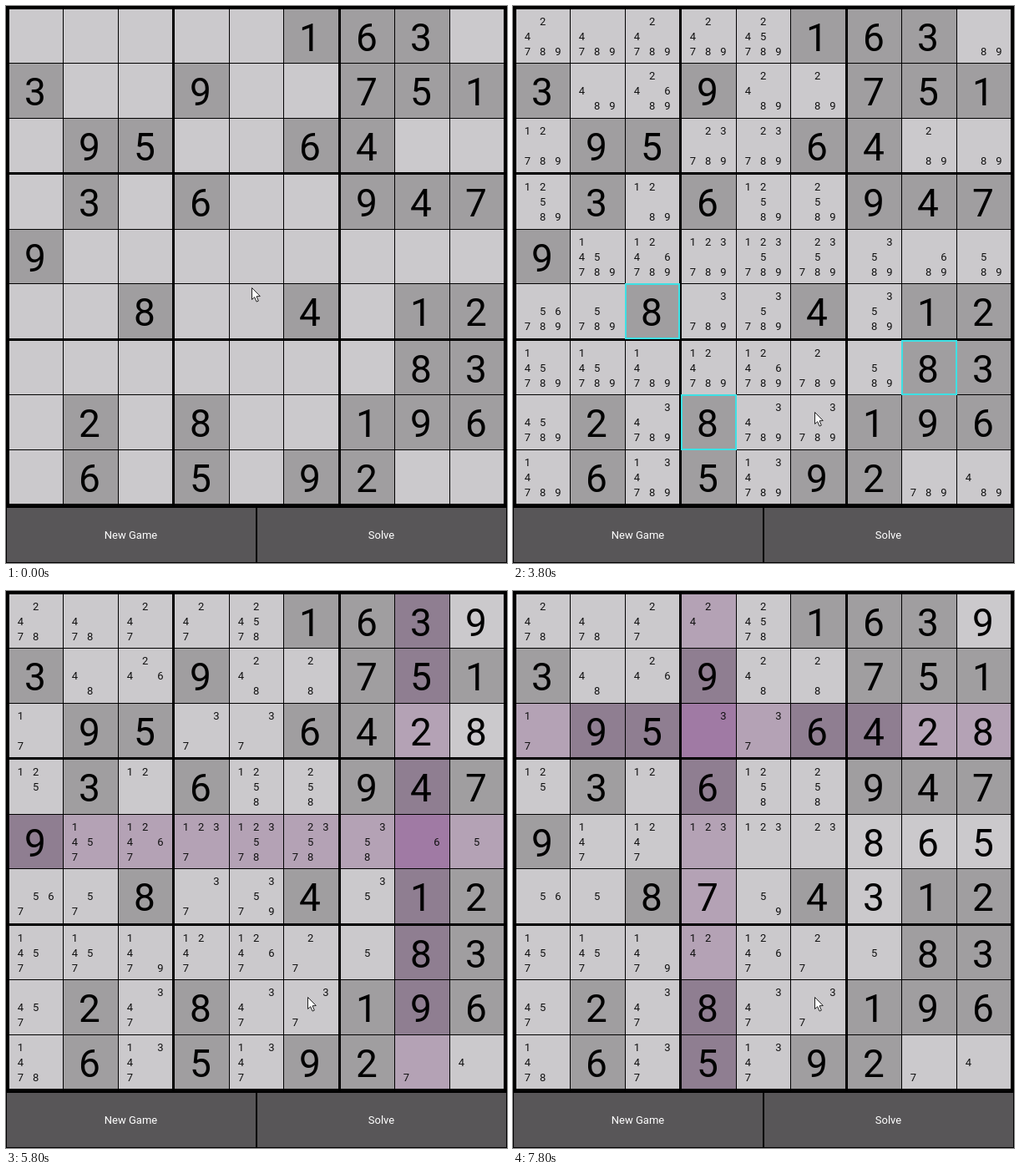
An HTML page with a canvas that plays this animation: 600 by 667 pixels, repeating every 8 s.

```html
<!DOCTYPE html>
<html lang="en">
<head>
<meta charset="utf-8">
<title>Sudoku solver</title>
<style>
  html, body { margin: 0; width: 100%; height: 100%; overflow: hidden; background: #000; }
  canvas { display: block; width: 600px; height: 667px; }
</style>
</head>
<body>
<canvas id="stage" width="600" height="667"></canvas>
<script>
const LOOP = 8000;
const ctx = document.getElementById('stage').getContext('2d');
const puzzle = '.....163.3..9..751.95..64...3.6..9479..........8..4.12.......83.2.8..196.6.5.92..';
const given = [...puzzle].map(ch => +ch || 0);
const rowOf = i => Math.floor(i / 9), colOf = i => i % 9;
const boxOf = i => Math.floor(rowOf(i) / 3) * 3 + Math.floor(colOf(i) / 3);
const arePeers = (a, b) => a !== b &&
  (rowOf(a) === rowOf(b) || colOf(a) === colOf(b) || boxOf(a) === boxOf(b));

// Cell edges: thin gaps of 1px, box gaps of 3px
const SIZE = 580 / 9;
const edge = n => 4 + n * (SIZE + 1) + 2 * Math.floor(n / 3);
const start = n => Math.round(edge(n));
const end = n => Math.round(edge(n) + SIZE);

// Run the solver once and record a timeline of board states
const timeline = [];
const board = [...given];
let notes = given.map(() => new Set());

function record(time, marks = {}) {
  timeline.push({ time, board: [...board], notes: notes.map(s => [...s]), digit: 0, focus: -1, ...marks });
}
function eliminate(cell) {
  notes.forEach((set, i) => { if (arePeers(i, cell)) set.delete(board[cell]); });
}

record(0);
notes = given.map(v => new Set(v ? [] : [1, 2, 3, 4, 5, 6, 7, 8, 9]));
record(800);
for (let digit = 1; digit <= 9; digit++) {
  const time = 600 + 400 * digit;
  record(time, { digit });
  given.forEach((v, i) => { if (v === digit) eliminate(i); });
  record(time + 200, { digit });
}
record(4500);
for (let k = 0; k < 9; k++) {
  const time = 4600 + 400 * k;
  const focus = notes.findIndex(s => s.size === 1);
  record(time, { focus });
  board[focus] = [...notes[focus]][0];
  notes[focus].clear();
  eliminate(focus);
  record(time + (k < 2 ? 200 : 300), { focus });
}

function text(str, x, y, size, color) {
  ctx.font = `${size}px Roboto, sans-serif`;
  ctx.textAlign = 'center';
  ctx.fillStyle = color;
  ctx.fillText(str, x, y);
}

function cellColor(i, focus) {
  if (i === focus) return '#a07aa4';
  const lit = focus >= 0 && (rowOf(i) === rowOf(focus) || colOf(i) === colOf(focus));
  if (given[i]) return lit ? '#8f7e91' : '#a09ea0';
  return lit ? '#b4a2b5' : '#cbc9cc';
}

function drawCell(state, i) {
  const x = start(colOf(i)), y = start(rowOf(i));
  ctx.fillStyle = cellColor(i, state.focus);
  ctx.fillRect(x, y, end(colOf(i)) - x, end(rowOf(i)) - y);
  if (state.board[i]) text(state.board[i], x + 31, y + 50, 46, '#000');
  for (const n of state.notes[i]) {
    text(n, x + 13.3 + (n - 1) % 3 * 18.3, y + 19 + Math.floor((n - 1) / 3) * 18, 13, '#111');
  }
}

function drawRing(i) {
  const x = start(colOf(i)), y = start(rowOf(i));
  ctx.strokeStyle = '#3ee0e4';
  ctx.lineWidth = 2;
  ctx.strokeRect(x, y, end(colOf(i)) - x, end(rowOf(i)) - y);
}

function drawButton(label, x) {
  ctx.fillStyle = '#585658';
  ctx.fillRect(x, 601, 298, 65);
  text(label, x + 148.5, 638, 13, '#fff');
}

function drawCursor(t) {
  const step = Math.min(11, Math.floor(t / 100));
  const ease = p => p * p * (3 - 2 * p);
  const down = ease(Math.min(1, step / 5)), back = ease(Math.max(0, (step - 6) / 5));
  ctx.save();
  ctx.translate(294.5 + 146 * down - 79 * back, 337.5 + 299 * down - 150 * back);
  ctx.beginPath();
  [[0, 0], [0, 14], [3.2, 11.2], [5.6, 16.6], [7.8, 15.6], [5.5, 10.3], [9.8, 10]]
    .forEach(p => ctx.lineTo(...p));
  ctx.closePath();
  ctx.fillStyle = '#fff';
  ctx.fill();
  ctx.strokeStyle = '#222';
  ctx.lineWidth = 1;
  ctx.stroke();
  ctx.restore();
}

function draw(t) {
  const state = timeline.filter(s => s.time <= t).pop();
  ctx.fillStyle = '#000';
  ctx.fillRect(0, 0, 600, 667);
  given.forEach((v, i) => drawCell(state, i));
  given.forEach((v, i) => { if (v && v === state.digit) drawRing(i); });
  drawButton('New Game', 1);
  drawButton('Solve', 301);
  drawCursor(t);
}

const began = performance.now();
function tick() {
  draw((performance.now() - began) % LOOP);
  requestAnimationFrame(tick);
}
tick();
</script>
</body>
</html>
```
